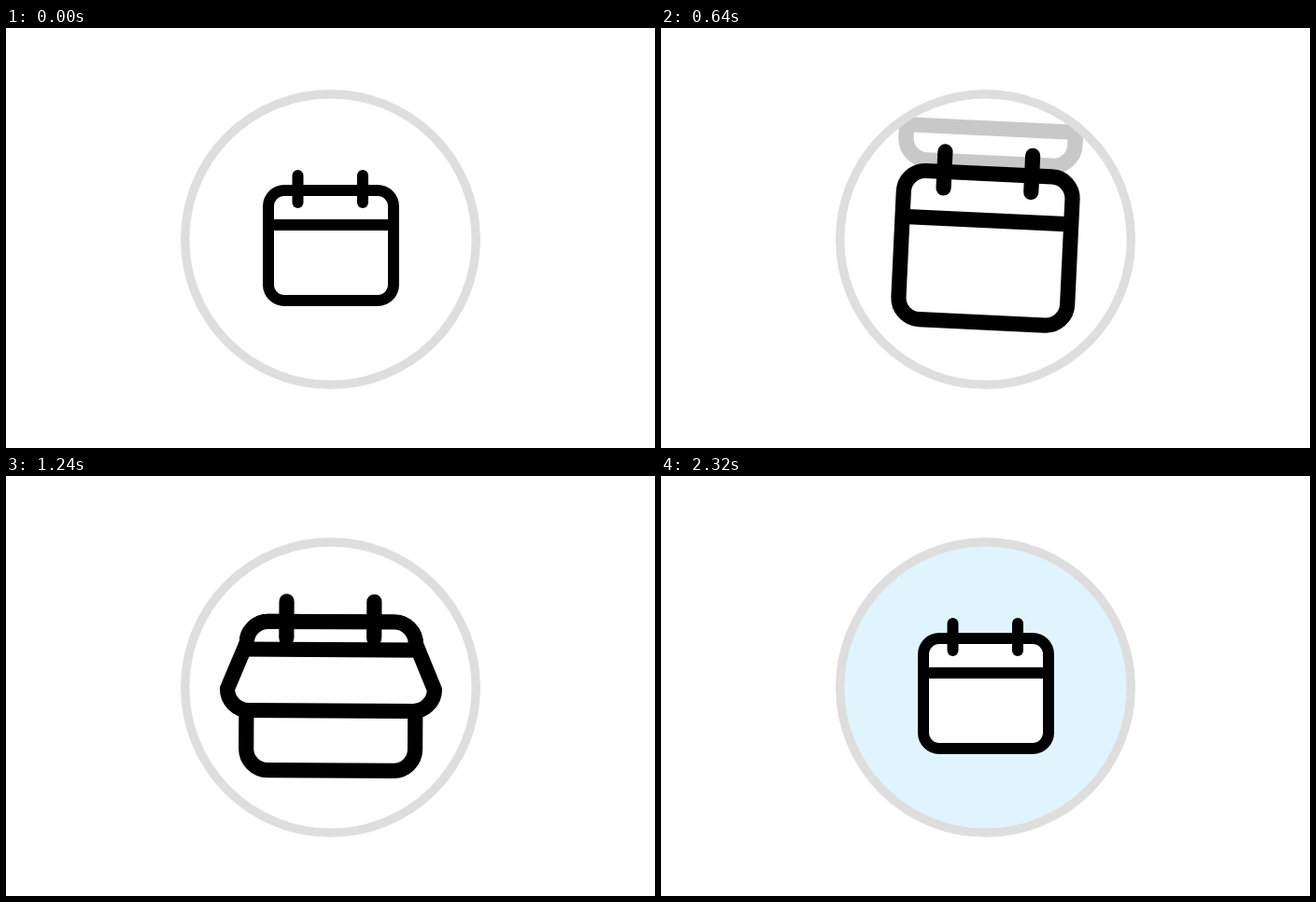
Write an HTML page with a canvas that moves like this. It is 695 px wide and 450 px high and loops after 3040 ms.

```html
<!DOCTYPE html>
<html>
<head>
<meta charset="utf-8">
<style>
html, body { margin: 0; width: 100%; height: 100%; overflow: hidden; background: #fff; }
canvas { display: block; }
</style>
</head>
<body>
<canvas id="stage" width="695" height="450"></canvas>
<script>
const ctx = document.getElementById('stage').getContext('2d');
const LOOP = 3040, STEP = 40;
const CX = 348, CY = 225;        // pivot of the calendar
const LEFT = 281, RIGHT = 415, TOP = 174, BOTTOM = 292, RADIUS = 17, HEADER = 211;
const TRAVEL = 1.74;             // sheet heights covered by a full turn

// Eased progress between two times
function ease(t, from, to) {
  const p = Math.min(1, Math.max(0, (t - from) / (to - from)));
  return p * p * (3 - 2 * p);
}

function line(points, width, color) {
  ctx.beginPath();
  points.forEach(p => ctx.lineTo(...p));
  ctx.lineWidth = width;
  ctx.strokeStyle = color;
  ctx.stroke();
}

function disc(x, y, r, color) {
  ctx.beginPath();
  ctx.arc(x, y, r, 0, Math.PI * 2);
  ctx.fillStyle = color;
  ctx.fill();
}

// A sheet turned about its top: 0 hangs down, 1 is thrown over.
// Corners keep their roundness while the free edge moves.
function sheet(turn, color) {
  const fold = 1 - TRAVEL * turn;
  const flare = 15.3 * Math.sin(Math.PI * Math.min(1, 2 * turn));
  const top = fold < 0 ? TOP - 8.7 : TOP;
  const bottom = top + (BOTTOM - TOP) * fold;
  const ry = Math.sign(fold) * Math.min(RADIUS, Math.abs(bottom - top) / 2);
  const k = 0.45;
  ctx.beginPath();
  // Each corner with the directions of the side before and the side after it
  const corner = (x, y, ax, ay, bx, by) => {
    const at = (dx, dy, f) => [x + dx * RADIUS * f, y + dy * ry * f];
    ctx.lineTo(...at(ax, ay, 1));
    ctx.bezierCurveTo(...at(ax, ay, k), ...at(bx, by, k), ...at(bx, by, 1));
  };
  corner(LEFT, top, 0, 1, 1, 0);
  corner(RIGHT, top, -1, 0, 0, 1);
  corner(RIGHT + flare, bottom, 0, -1, -1, 0);
  corner(LEFT - flare, bottom, 1, 0, 0, -1);
  ctx.closePath();
  ctx.fillStyle = '#fff';
  ctx.fill();
  ctx.lineWidth = 12;
  ctx.strokeStyle = color;
  ctx.stroke();
  const h = (HEADER - TOP) / (BOTTOM - TOP), y = top + (bottom - top) * h;
  line([[LEFT - flare * h, y], [RIGHT + flare * h, y]], 12, color);
}

// The part of the tick between two fractions of its length
function tick(from, to) {
  if (to <= from) return;
  const a = [312, 246], b = [337, 267], c = [381, 231];
  const first = Math.hypot(b[0] - a[0], b[1] - a[1]);
  const bend = first / (first + Math.hypot(c[0] - b[0], c[1] - b[1]));
  const mix = (p, q, u) => [p[0] + (q[0] - p[0]) * u, p[1] + (q[1] - p[1]) * u];
  const at = f => f < bend ? mix(a, b, f / bend) : mix(b, c, (f - bend) / (1 - bend));
  const points = [at(from), at(to)];
  if (from < bend && to > bend) points.splice(1, 0, b);
  line(points, 9.3, '#1ab2ff');
  if (from > 0) disc(...points[0], 3.5, '#5c6468');
}

function draw(t) {
  const leave = t < 1920 ? 0 : ease(t, 1640, 2300);
  const scale = 1 + 0.35 * (ease(t, 60, 420) - leave);
  const tilt = -4.2 * ease(t, 60, 280) + 8.2 * ease(t, 280, 760) - 4 * ease(t, 760, 1340);
  const turns = [
    ease(t, 60, 335) - ease(t, 1061, 1321),
    ease(t, 340, 610) - ease(t, 739, 999)
  ];
  const over = 1 / TRAVEL;

  ctx.fillStyle = '#fff';
  ctx.fillRect(0, 0, 695, 450);
  ctx.globalAlpha = leave;
  disc(347.5, 226.5, 152, '#e0f4fe');
  ctx.globalAlpha = 1;

  ctx.save();
  ctx.beginPath();
  ctx.arc(347.5, 226.5, 152, 0, Math.PI * 2);
  ctx.clip();
  ctx.translate(CX, CY);
  ctx.rotate(tilt * Math.PI / 180);
  ctx.scale(scale, scale);
  ctx.translate(-CX, -CY);
  ctx.lineJoin = 'round';
  turns.filter(u => u > over).forEach(u => sheet(u, '#c8c8c8'));
  sheet(0, '#000');
  turns.filter(u => u > 0 && u <= over).forEach(u => sheet(u, '#000'));
  ctx.lineCap = 'round';
  for (const x of [312.5, 382]) line([[x, 158], [x, 187]], 12, '#000');
  tick(leave, ease(t, 1320, 1640));
  ctx.restore();

  ctx.beginPath();
  ctx.arc(347.5, 226.5, 155.8, 0, Math.PI * 2);
  ctx.lineWidth = 9.4;
  ctx.strokeStyle = '#dedede';
  ctx.stroke();
}

function frame() {
  draw(Math.floor(performance.now() % LOOP / STEP) * STEP);
  requestAnimationFrame(frame);
}
frame();
</script>
</body>
</html>
```
